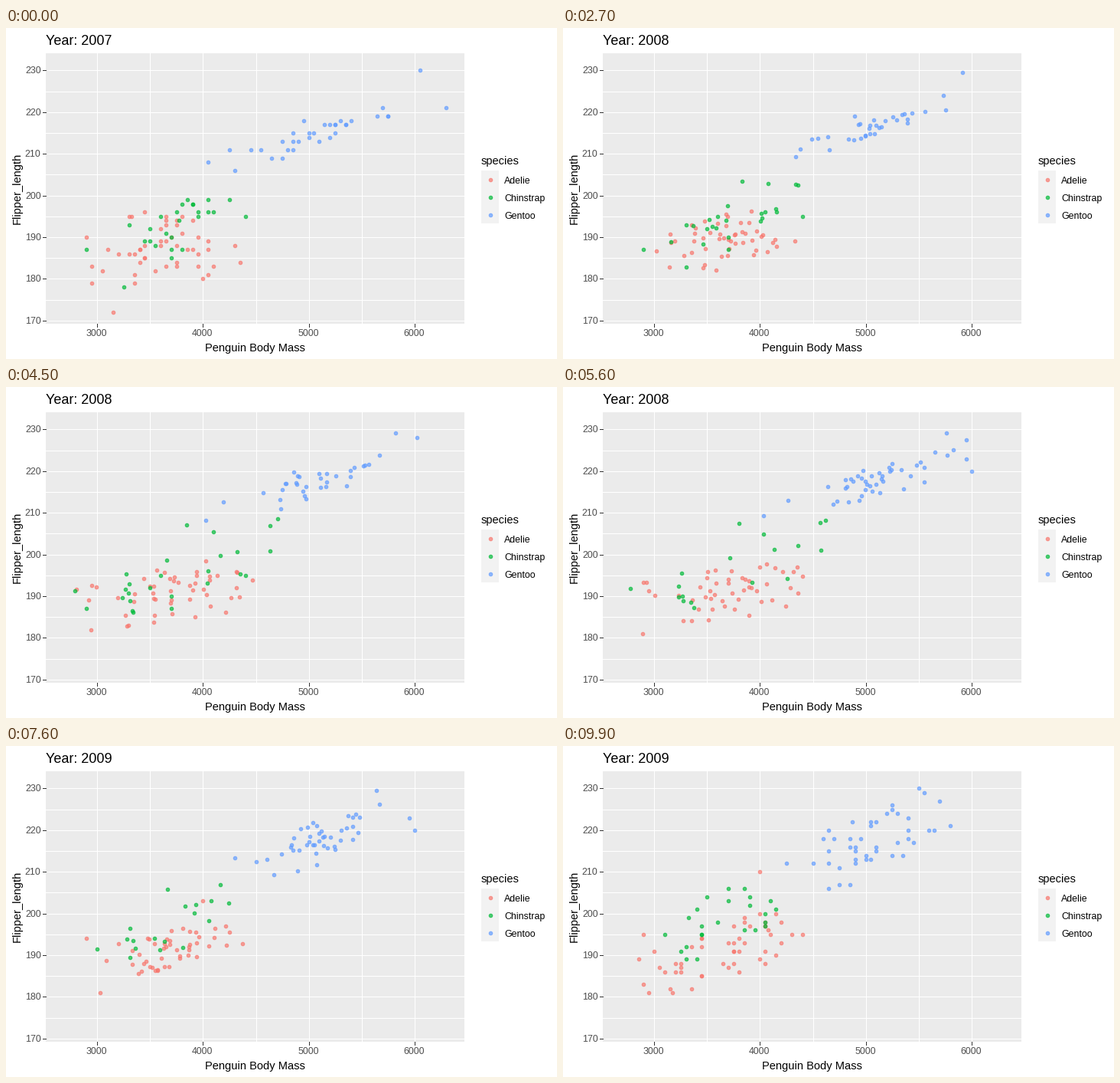
A matplotlib script for the animation above (10 s loop, 720 by 432 pixels).

```python
import numpy as np
import matplotlib.pyplot as plt
from matplotlib.animation import FuncAnimation
from matplotlib.patches import Rectangle

W, H, DPI = 720, 432, 96
FRAMES, LOOP = 100, 10000
LEFT, RIGHT, TOP, BOTTOM = 52, 599, 33, 386
GREY, DARK = "#4D4D4D", "#333333"
NONE = (np.nan, np.nan)

plt.rcParams["font.family"] = ["Liberation Sans", "DejaVu Sans"]
rng = np.random.default_rng(7)

# trend: mean mass, spread, mean length, slope, noise for each year
# runs: number of points, first year, last year
# keys: outlying points followed through the three years
SPECIES = {
    "Adelie": dict(
        color="#F8766D",
        trend=[(3640, 330, 187, .004, 5),
               (3700, 430, 191, .004, 3.8),
               (3650, 430, 192, .0065, 4.6)],
        runs=[(47, 0, 2), (2, 2, 2)],
        keys=[[(3800, 191), (2850, 181), (3175, 181)],
              [(3150, 172), (4150, 197), (4075, 196)],
              [(3325, 195), (4000, 195), (4000, 210)]]),
    "Chinstrap": dict(
        color="#00BA38",
        trend=[(3720, 240, 193, .011, 4),
               (3760, 460, 197, .009, 4.5),
               (3700, 330, 198, .012, 4.5)],
        runs=[(15, 0, 2), (6, 0, 0), (6, 2, 2)],
        keys=[[(3775, 194), (4800, 210), (3450, 197)],
              [(3700, 185), (2700, 192), (3250, 191)],
              [(3250, 178), (3350, 187), (3325, 199)],
              [(2900, 187), NONE, NONE],
              [(4400, 195), NONE, NONE]]),
    "Gentoo": dict(
        color="#619CFF",
        trend=[(4950, 460, 214, .006, 2.4),
               (5000, 470, 217.5, .0085, 2.8),
               (5100, 390, 218, .01, 4)],
        runs=[(31, 0, 2), (10, 1, 2)],
        keys=[[(6050, 230), (5800, 229), (5500, 230)],
              [(6300, 221), (5300, 220), (4875, 222)],
              [(4800, 211), (3950, 208), (4600, 218)],
              [NONE, (5950, 223), NONE],
              [NONE, (6000, 220), NONE]]),
}


def px(mass):
    return np.floor(LEFT + (mass - 2520) / 3960 * (RIGHT - LEFT) + .5) + .5


def py(length):
    return np.floor(BOTTOM - (length - 169.05) / 64.9 * (BOTTOM - TOP) + .5) + .5


def cloud(n, first, last, trend):
    """Seeded points around each year's trend line, on the measuring grid."""
    out = np.full((n, 3, 2), np.nan)
    for year in range(first, last + 1):
        mass, spread, length, slope, noise = trend[year]
        dm = spread * rng.triangular(-2.4, 0, 2.4, n)
        f = length + slope * dm + noise * rng.triangular(-2.4, 0, 2.4, n)
        out[:, year, 0] = np.round((mass + dm) / 50) * 50
        out[:, year, 1] = np.minimum(np.round(f), 230)
    return out


def paths(spec):
    parts = [cloud(*run, spec["trend"]) for run in spec["runs"]]
    return np.concatenate([np.array(spec["keys"], float)] + parts)


fig = plt.figure(figsize=(W / DPI, H / DPI), dpi=DPI, facecolor="white")
ax = fig.add_axes([0, 0, 1, 1])
ax.set(xlim=(0, W), ylim=(H, 0))
ax.axis("off")


def box(x, y, w, h, color):
    ax.add_patch(Rectangle((x, y), w, h, fc=color, lw=0, antialiased=False))


def rule(x, y, color):
    ax.plot(x, y, color=color, lw=.75, antialiased=False,
            solid_capstyle="butt", zorder=1.5)


def label(x, y, s, size, color="black", **kw):
    return ax.text(x, y, s, fontsize=size, color=color, **kw)


def dots(x, y, color):
    return ax.plot(x, y, "o", ms=3.5, mew=.7, color=color, alpha=.7)[0]


box(LEFT, TOP, RIGHT - LEFT, BOTTOM - TOP, "#EBEBEB")
for m in range(3000, 6001, 500):
    x = px(m)
    rule([x, x], [TOP, BOTTOM], "white")
    if m % 1000 == 0:
        rule([x, x], [BOTTOM, BOTTOM + 3.7], DARK)
        label(x, 402.5, str(m), 9.3, GREY, ha="center")
for f in range(170, 231, 5):
    y = py(f)
    rule([LEFT, RIGHT], [y, y], "white")
    if f % 10 == 0:
        rule([LEFT - 3.7, LEFT], [y, y], DARK)
        label(45.5, y + 4.5, str(f), 9.3, GREY, ha="right")

title = label(LEFT, 22, "", 13.5)
label(325.5, 422, "Penguin Body Mass", 11, ha="center")
label(14.6, 209, "Flipper_length", 11, rotation=90, ha="center", va="center")
label(621, 178, "species", 11)

groups = []
for i, (name, spec) in enumerate(SPECIES.items()):
    y = 186 + 23 * i
    box(621, y, 23, 23, "#F2F2F2")
    dots([632.5], [y + 11.5], spec["color"])
    label(651, y + 17, name, 9.3)
    groups.append((dots([], [], spec["color"]), paths(spec)))


def draw(i):
    t = 2 * i / (FRAMES - 1)
    k = int(t)
    for line, path in groups:
        a, b = path[:, k], path[:, min(k + 1, 2)]
        # a point with no successor waits in place, then drops out
        p = a + (np.where(np.isnan(b), a, b) - a) * (t - k)
        line.set_data(px(p[:, 0]), py(p[:, 1]))
    title.set_text(f"Year: {round(2007 + t)}")
    return [title] + [line for line, _ in groups]


anim = FuncAnimation(fig, draw, frames=FRAMES, interval=LOOP // FRAMES,
                     repeat=True, repeat_delay=0)
plt.show()
```
